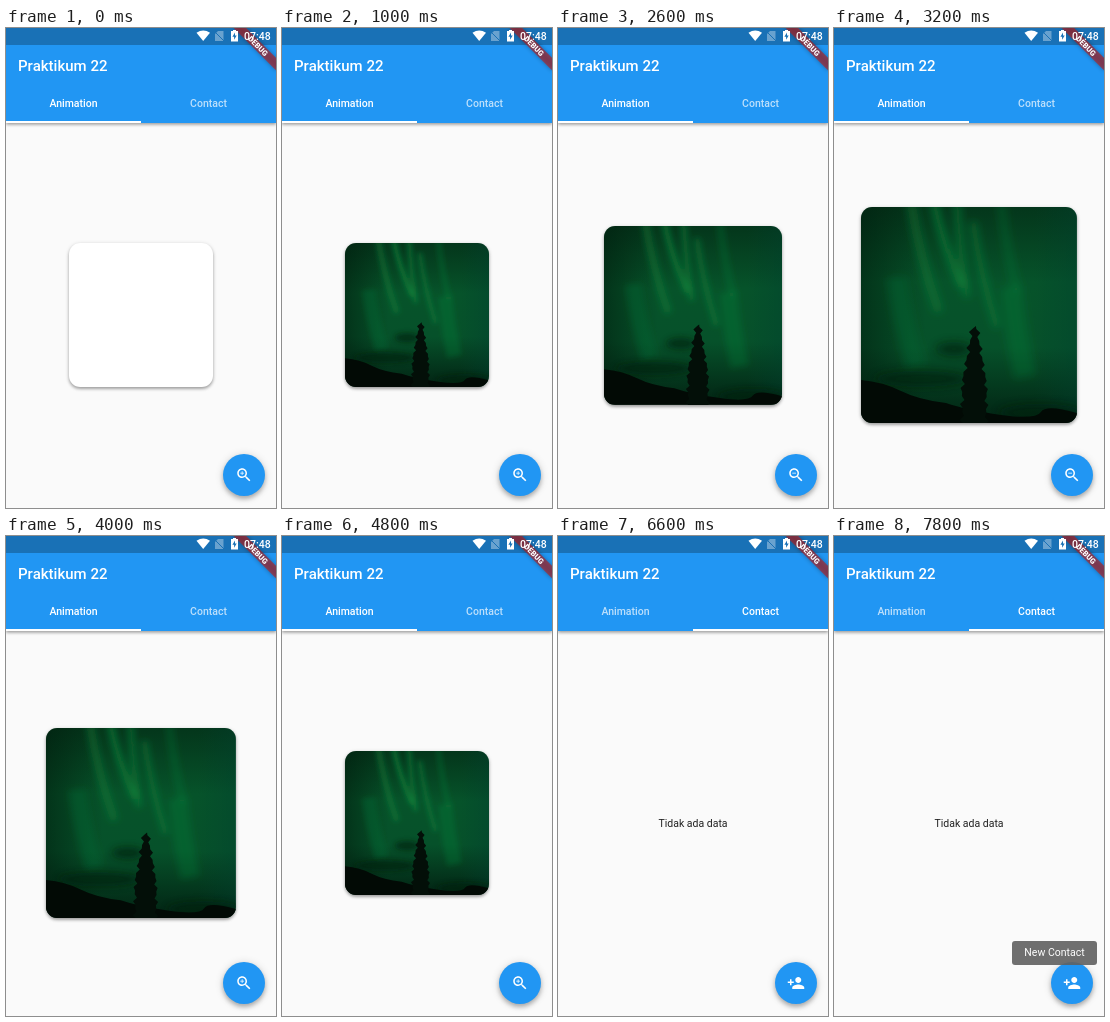
These frames come from a looping animation (270 by 480 pixels, 8000 ms). An HTML page:

```html
<!DOCTYPE html>
<html lang="id">
<head>
<meta charset="utf-8">
<title>Praktikum 22</title>
<style>
  html, body { margin: 0; width: 100%; height: 100%; overflow: hidden; }
  body { position: relative; background: #fafafa; font: 10.5px/14px Roboto, sans-serif; }
  body *, svg { position: absolute; box-sizing: border-box; }
  #bar { left: 0; top: 0; width: 270px; height: 95px; background: #2196f3; color: #fff; font-weight: 500;
    box-shadow: 0 1.5px 3px rgba(0,0,0,.3), 0 1px 4px rgba(0,0,0,.15); }
  #status { left: 0; top: 0; width: 270px; height: 17px; background: #1971b6; }
  #title { left: 12px; top: 28px; font-size: 15px; line-height: 20px; white-space: nowrap; }
  .tab { top: 69px; width: 135px; text-align: center; }
  #line { top: 93.3px; width: 135px; height: 1.7px; background: #fff; }
  .page { left: 0; top: 0; width: 270px; height: 480px; }
  #card { background: #fff; border-radius: 11.25px; overflow: hidden;
    box-shadow: 0 2px 3px rgba(0,0,0,.27), 0 1px 4px rgba(0,0,0,.16); }
  #photo { width: 100%; height: 100%; left: 0; top: 0; }
  .fab { left: 216.5px; top: 426px; width: 42px; height: 42px; border-radius: 50%; background: #2196f3;
    box-shadow: 0 3px 4px rgba(0,0,0,.24), 0 1px 8px rgba(0,0,0,.16); }
  .fab svg { left: 12px; top: 12px; width: 18px; height: 18px; fill: #fff; }
  .splash { inset: 0; border-radius: 50%; background: #fff; }
  #empty { width: 270px; top: 281px; text-align: center; color: #212121; }
  #tip { left: 178px; top: 405px; width: 85px; height: 24px; border-radius: 3px; text-align: center;
    background: rgba(97,97,97,.9); color: #fff; line-height: 24px; }
  #top { left: 0; top: 0; width: 270px; height: 60px; }
</style>
</head>
<body>
<div class="page" id="animation">
  <div id="card">
    <svg id="photo" viewBox="0 0 216 216">
      <defs>
        <linearGradient id="sky" x2="0" y2="1">
          <stop offset="0" stop-color="#04361b"/>
          <stop offset=".35" stop-color="#06532a"/>
          <stop offset=".65" stop-color="#06512a"/>
          <stop offset="1" stop-color="#022313"/>
        </linearGradient>
        <linearGradient id="side">
          <stop offset="0" stop-color="#00160a" stop-opacity=".5"/>
          <stop offset=".3" stop-color="#00160a" stop-opacity="0"/>
          <stop offset=".8" stop-color="#004030" stop-opacity="0"/>
          <stop offset="1" stop-color="#004030" stop-opacity=".4"/>
        </linearGradient>
        <filter id="soft" x="-50%" y="-50%" width="200%" height="200%"><feGaussianBlur stdDeviation="4"/></filter>
      </defs>
      <path fill="url(#sky)" d="M0 0h216v216H0z"/>
      <path fill="url(#side)" d="M0 0h216v216H0z"/>
      <g id="rays" filter="url(#soft)" stroke="#159040" fill="none"></g>
      <g filter="url(#soft)" fill="#02200f" opacity=".65">
        <ellipse cx="93" cy="142" rx="18" ry="7"/>
        <ellipse cx="60" cy="172" rx="46" ry="8"/>
        <ellipse cx="180" cy="206" rx="42" ry="9"/>
      </g>
      <path fill="#020a05" d="M0 173Q22 175 40 184T85 196Q105 203 140 208T180 205T216 206V216H0z"/>
      <path id="tree" fill="#030f08"/>
    </svg>
  </div>
  <div class="fab"><div class="splash"></div><svg viewBox="0 0 24 24">
    <path d="M15.5 14h-.79l-.28-.27C15.41 12.59 16 11.11 16 9.5 16 5.91 13.09 3 9.5 3S3 5.91 3 9.5 5.91 16 9.5 16c1.61 0 3.09-.59 4.23-1.57l.27.28v.79l5 4.99L20.49 19l-4.99-5zm-6 0C7.01 14 5 11.99 5 9.5S7.01 5 9.5 5 14 7.01 14 9.5 11.99 14 9.5 14zM7 9h5v1H7z"/>
    <path id="plus" d="M9 7h1v5H9z"/></svg></div>
</div>
<div class="page" id="contact">
  <div id="empty">Tidak ada data</div>
  <div class="fab"><div class="splash"></div><svg viewBox="0 0 24 24">
    <path d="M15 12c2.21 0 4-1.79 4-4s-1.79-4-4-4-4 1.79-4 4 1.79 4 4 4zm-9-2V7H4v3H1v2h3v3h2v-3h3v-2H6zm9 4c-2.67 0-8 1.34-8 4v2h16v-2c0-2.66-5.33-4-8-4z"/></svg></div>
</div>
<div id="bar">
  <div id="status"></div>
  <div id="title">Praktikum 22</div>
  <div class="tab" style="left:0">Animation</div>
  <div class="tab" style="left:135px">Contact</div>
  <div id="line"></div>
</div>
<svg id="top" viewBox="0 0 270 60" fill="#fff">
  <g transform="translate(270) rotate(45)">
    <path fill="#b71c1c" fill-opacity=".63" style="filter:drop-shadow(0 0 2px rgba(0,0,0,.5))" d="M-30 21h60v9h-60z"/>
    <text y="28.2" text-anchor="middle" font-size="7.65" font-weight="900">DEBUG</text>
  </g>
  <path d="M190.5 4.8Q197.2 0 204 4.8L197.2 13z"/>
  <path opacity=".35" d="M212 3h5.5v10H209V6z"/>
  <path stroke="#1971b6" d="M208 3l10 10"/>
  <path d="M227 2h3v1h2v10.5h-7V3h2z"/>
  <path fill="#1971b6" d="M229 4.5l-2.6 4.3h1.7v3l2.6-4.4H229z"/>
  <text x="238" y="11.8" font-size="10.5" font-weight="500">07:48</text>
</svg>
<div id="tip">New Contact</div>
<script>
const $ = id => document.getElementById(id);
const tabs = document.querySelectorAll('.tab');
const splashes = document.querySelectorAll('.splash');

// Aurora rays: x, y, lean, length, width, opacity
$('rays').innerHTML = [
  [50, -5, 28, 110, 9, .4], [73, -5, 28, 85, 6, .7], [96, -5, 10, 95, 6, .55],
  [112, 15, 24, 105, 7, .45], [140, -5, 16, 90, 8, .25], [150, 80, 14, 90, 22, .25], [35, 70, 20, 90, 20, .2]
].map(([x, y, lean, len, w, o]) =>
  `<path d="M${x} ${y}q${lean * .3} ${len * .5} ${lean} ${len}" stroke-width="${w}" opacity="${o}"/>`).join('');

// Ragged conifer, widening in a few tiers
const left = [], right = [];
for (let i = 0; i <= 24; i++) {
  const y = 121 + i * 4;
  const w = 1.5 + 10 * Math.min(1, i / 14) + (i % 2 ? 2.4 : 0) + 1.4 * Math.sin(i * 1.7);
  left.push(`${114 - w} ${y}`);
  right.unshift(`${114 + w * .9} ${y + 1}`);
}
$('tree').setAttribute('d', `M115 119L${left.concat(right).join('L')}z`);

// Page drag, then settle: [ms, px]
const swipe = [[4850, 0], [5000, 12], [5200, 40], [5400, 84], [5600, 195], [5800, 242],
  [6000, 259], [6200, 266], [6400, 269], [6600, 270]];

function along(keys, t) {
  if (t <= keys[0][0]) return keys[0][1];
  for (let i = 1; i < keys.length; i++) {
    const [a, p] = keys[i - 1], [b, q] = keys[i];
    if (t < b) return p + (q - p) * (t - a) / (b - a);
  }
  return keys[keys.length - 1][1];
}

const press = (t, start) => t < start ? 0 : Math.max(0, .17 - (t - start) * .0005);

function draw(t) {
  const size = 144 + Math.max(0, Math.min(t - 2040, 4740 - t)) * .062;
  Object.assign($('card').style, {
    width: size + 'px', height: size + 'px', left: 135 - size / 2 + 'px', top: 287.3 - size / 2 + 'px'
  });
  $('photo').style.display = t < 200 ? 'none' : '';
  $('plus').style.display = t > 2040 && t < 3390 ? 'none' : '';

  const x = along(swipe, t), k = x / 270;
  $('animation').style.transform = `translateX(${-x}px)`;
  $('contact').style.transform = `translateX(${270 - x}px)`;
  $('line').style.left = x / 2 + 'px';
  tabs[0].style.opacity = 1 - .3 * k;
  tabs[1].style.opacity = .7 + .3 * k;

  splashes[0].style.opacity = press(t, 2200) * (t < 3400) + press(t, 3400);
  splashes[1].style.opacity = t >= 7200 && t < 7800 ? .1 : 0;
  $('tip').style.opacity = Math.max(0, Math.min(1, (t - 7500) / 150));
}

// The screen refreshes five times a second
function tick() {
  draw(Math.floor(performance.now() % 8000 / 200) * 200);
  requestAnimationFrame(tick);
}
tick();
</script>
</body>
</html>
```
